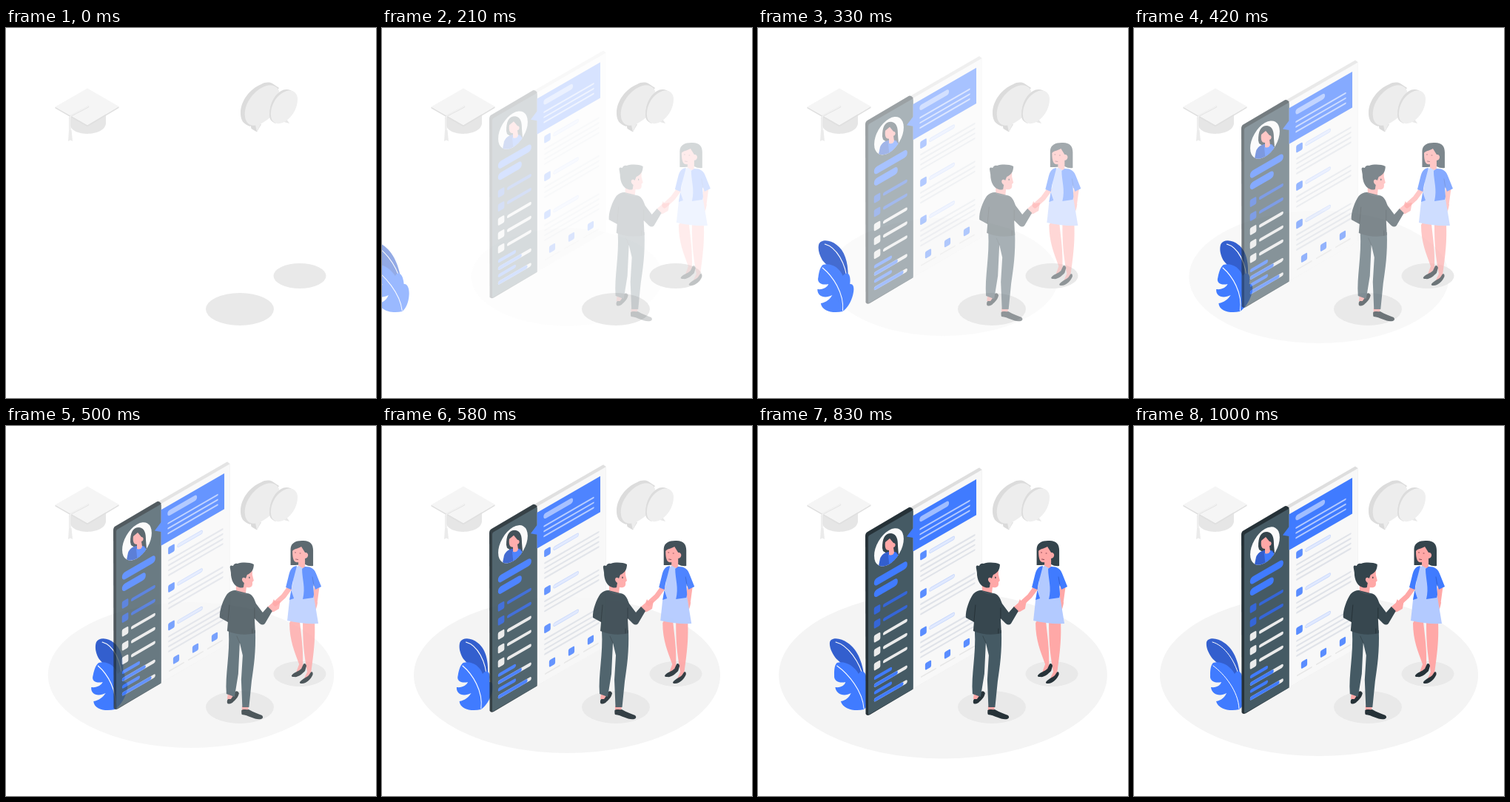
Write an HTML page that moves like this. It is 500 by 500 pixels and loops after 1.04 s.

```html
<!DOCTYPE html>
<html lang="en">
<head>
<meta charset="utf-8">
<title>Job interview</title>
<style>
  html, body { margin: 0; width: 100%; height: 100%; overflow: hidden; background: #fff; }
  svg { display: block; width: 100%; height: 100%; }
  .line { fill: none; stroke-linecap: round; stroke-linejoin: round; }
  .skin { fill: #ffa8a7; }
  .blue { fill: #407bff; }
  .navy { fill: #335fce; }
  .dark { fill: #263238; }
  .slate { fill: #455a64; }
  .knit { fill: #37474f; }
  .hair { fill: #34444c; }
</style>
</head>
<body>
<svg viewBox="0 0 500 500">
  <defs>
    <clipPath id="disc"><circle r="23" transform="matrix(.866 -.5 0 1 177 162)"/></clipPath>
  </defs>

  <ellipse id="floor" rx="215" ry="109.5" fill="#f4f4f4"/>
  <g fill="#e9e9e9">
    <ellipse cx="316" cy="380" rx="46" ry="22"/>
    <ellipse cx="397" cy="335" rx="35.5" ry="17"/>
  </g>

  <g id="cap">
    <path d="M87 118V132C90 147 133 147 135 129V116L110 131Z" fill="#e6e6e6"/>
    <path d="M66.500 106.500L110 131.500L152.500 106V108L110 133.500L66.500 108.500Z" fill="#e0e0e0"/>
    <path d="M66.500 106.500L110 81.500L152.500 106L110 131Z" fill="#f5f5f5"/>
    <path class="line" d="M111 106.500L88 118.500Q86 120 86.500 124V138" stroke="#e4e4e4" stroke-width="2.500"/>
    <path class="line" d="M111 106L88 118Q86.500 120 86.500 124V138" stroke="#f3f3f3" stroke-width="1.300"/>
    <path d="M85 138H88.500L90 153L87 151.500L84 153Z" fill="#ebebeb"/>
  </g>

  <g id="bubbles">
    <path d="M330.500 131L331.500 136L339 140.500L345 130Z" fill="#dadada"/>
    <path d="M317 115C317 98 330 82 345 76C350 73 356 73 360 75L369 81L330 133C321 130 317 125 317 115Z" fill="#dcdcdc"/>
    <path d="M339 140.500L346 126L337 131Z" fill="#ededed"/>
    <path d="M323 120C321 104 333 86 349 79C362 74 371 81 370 93C369 108 360 120 350 126C338 135 325 134 323 120Z" fill="#ededed"/>
    <path d="M372 126L383 129L379 123Z" fill="#e8e8e8"/>
    <path d="M356 117C356 101 364 88 375 83.500C381 82 385 84 388 86L364 129C358 126 356 123 356 117Z" fill="#dcdcdc"/>
    <path d="M358 119C357 105 365 91 377 86C386 82 394 87 394 96C394 110 385 123 374 128C366 131 359 128 358 119Z" fill="#efefef"/>
  </g>

  <g id="plant">
    <path class="navy" d="M98 292C100 285 113 286 122 293C136 302 143 322 144 346H134C130 330 112 322 105 313C100 306 97 298 98 292Z"/>
    <path class="line" d="M106 292C122 296 138 318 143 343" stroke="#fff"/>
    <path class="blue" d="M107 320C118 317 130 324 136 335C140 328 147 331 147 346C152 345 154 352 153 360C152 370 147 380 142 383C130 386 114 383 111 372C118 371 123 366 125 361C116 366 105 363 104 353C112 354 117 350 118 346C110 348 102 345 103 337C103 328 104 323 107 320Z"/>
    <path class="line" d="M107 324C122 335 141 358 142 382" stroke="#fff"/>
  </g>

  <g id="panel">
    <path d="M206 108L299 54.400L302.500 57V299L209.500 353Z" fill="#dedede"/>
    <path class="dark" d="M145 146.500Q145 143 148 141.200L204 108.200Q206.500 107 209.600 110.500V353.500L151 388.300Q147 390.200 145.500 387Z"/>
    <g id="sheet" transform="matrix(.866 -.5 0 1 149 147)">
      <rect x="70" y="-1" width="107.300" height="242" fill="#f8f8f8"/>
      <rect class="slate" y="-.5" width="70" height="242" rx="2"/>
      <path class="blue" d="M60 30.500L70 24V7.300H168.600V55.700H70V37Z"/>
      <circle r="23" cx="32.300" cy="31.200" fill="#fafafa"/>
    </g>
    <g clip-path="url(#disc)">
      <path class="hair" d="M168 163C168 150 171 143 180 143C188 144 189 152 189 160L190 172L180 174L169 167Z"/>
      <path class="navy" d="M162 192L165 177C167 172 171 169 176 168L186 168C190 170 191 176 191 192Z"/>
      <path class="blue" d="M176 172L184 168L189 172V192H178Z"/>
      <path class="skin" d="M172 155L178 150L183 156C187 156 186 162 183 162L184 169Q182 174 177 172V166C173 166 171 163 172 155Z"/>
    </g>
  </g>

  <g id="woman">
    <path class="hair" d="M378.500 166C379 157 387 154.500 396 155C405 155 409 160 409 168V189Q403 190 398 187L385 188H378.500Z"/>
    <path class="skin" d="M379 263L391 264C393 285 396 300 395 325L390 332L386 333L390 322C384 305 377 290 377 266ZM395 264H411C412 290 410 305 406 335L400 343L396 343L401 332C397 310 395 295 395 266Z"/>
    <path class="dark" d="M380 337C384 332 389 332 393 328L396 321.500Q399 320 400 324L398 331C394 335 389 340 383 339Q379 339 380 337ZM391 346C395 341 400 340 403 337L406 332.500Q409 331 408.500 336C406 342 400 348 394 348Q390 348 391 346Z"/>
    <path class="line" d="M377 219L369 230L358 240" stroke="#ffa8a7" stroke-width="7"/>
    <path class="line" d="M414 217L411 239" stroke="#ffa8a7" stroke-width="7"/>
    <path class="skin" d="M408 236L415 238C414 246 412 252 406 253L401 248Z"/>
    <path class="skin" d="M381 169C383 166 388 166 393 163L398 171C403 170 404 178 398 179V190L396 198L389 195V184C384 185 381 182 381 169Z"/>
    <path d="M384 193Q390 187 391 190L397 193L404 195L410 231L416 267Q395 268 374 263L377 235L381 215Z" fill="#b3caff"/>
    <path class="blue" d="M387 189C380 190 378 194 376 202L372 218L379 221L383 233L377 235L381 212ZM398 190C407 190 411 193 414 202L420 217L412 221L409 212L410 228L409 232L395 234C399 218 394 207 394 193Z"/>
    <path class="line" d="M408 204L410 216" stroke="#2f60d5"/>
    <path class="line" d="M384.500 171h1M391 172h1M385.500 180l3 .5" stroke="#8a4450" stroke-width="1"/>
  </g>

  <g id="man"><g transform="translate(.8 0)">
    <path class="dark" d="M292 374C291 368 296 368 299 365L303 359Q306 357 308 361C307 367 303 370 299 374Q293 377 292 374Z"/>
    <path class="skin" d="M293 361L302 362L297 369H292ZM312 378L321 379L320 385H312Z"/>
    <path class="dark" d="M311.500 384C314 382 317 384 321 383C328 387 334 389 339 391Q342 394 338 396C330 398 322 391 312 390Q311 388 311.500 384Z"/>
    <path class="slate" d="M294 276H330C331 305 328 325 325 345L321.500 380H312.500L311 343L313 310L309 293L307 335L302 366L291 362C289 335 296 310 294 276Z"/>
    <path class="line" d="M309 293L305 284" stroke="#37474f"/>
    <path class="skin" d="M346 245L353 239L355 234L357 237L364 236L362 247L355 251L349 252Z"/>
    <path class="skin" d="M310 196L326 194L326 201L328 209L326 211C327 217 324 219 318 218L317 227L304 225V212Z"/>
    <path class="hair" d="M296 192Q295 187 300 189Q302 185 306 186C312 184 322 184 328 187C328 195 324 199 319 201L317 206C312 202 310 209 315 212L314 218Q311 219 308 218C301 216 297 208 297 198Z"/>
    <path class="knit" d="M303 222L319 226C326 227 328 232 331 240L340 252L347 244L353 250L343 267Q340 270 336 267L329 260L330 280C318 283 303 282 292 277L293 265L282 259C281 249 287 234 292 227Q297 222 303 222Z"/>
    <path class="line" d="M304 223Q311 227 319 227" stroke="#4a5b64"/>
    <path class="line" d="M295 242L293 264M329 246V260M326 274V280" stroke="#263238"/>
    <path class="line" d="M322 204v1.500" stroke="#263238" stroke-width="1.200"/>
  </g></g>
</svg>
<script>
const BLUE = '#407bff', NAVY = '#3566d8', SKY = '#5a8dff', WHITE = '#ebebeb', GREY = '#e0e3e9';
const $ = id => document.getElementById(id);

function add(attrs) {
  const el = document.createElementNS('http://www.w3.org/2000/svg', 'rect');
  for (const key in attrs) el.setAttribute(key, attrs[key]);
  $('sheet').append(el);
}
// Horizontal bar with round ends, centred on y
const bar = (x1, x2, y, h, fill) =>
  add({ x: x1, y: y - h / 2, width: x2 - x1, height: h, rx: h / 2, fill });
const icon = (x, y, s, fill) =>
  add({ x: x - s / 2, y: y - s / 2, width: s, height: s, rx: 2, fill });

// Sidebar
bar(9, 61, 68, 10, BLUE);
bar(9, 46, 83.5, 10, BLUE);
for (let i = 0; i < 5; i++) {
  const y = 106 + i * 18.9, fill = i < 2 ? NAVY : WHITE;
  icon(13.9, y, 10, fill);
  bar(23, 61, y, 4.4, fill);
}
[[37, 0], [46, 61], [37, 0], [55, 61]].forEach(([done, end], i) => {
  const y = 197 + i * 9.8;
  if (end) bar(9, end, y, 4.8, WHITE);
  bar(9, done, y, 4.8, BLUE);
});

// Header
bar(80, 126, 18, 7.5, '#a0bdff');
for (let i = 0; i < 3; i++) bar(80, 159, 31.1 + i * 6.8, 2.2, '#b3caff');

// Sections
[4, 3, 4].forEach((lines, i) => {
  const y = 68.5 + i * 51.5;
  icon(86, y, 10, SKY);
  bar(95, 135, y + .5, 5.4, '#c6d6fb');
  bar(95.8, 134.2, y + .5, 3.6, '#e0e9ff');
  for (let j = 0; j < lines; j++) bar(81, 167, y + 13 + j * 6.7, 2.4, GREY);
});
for (let i = 0; i < 3; i++) {
  icon(93.5 + i * 30, 221, 9.5, SKY);
  bar(82 + i * 30, 106 + i * 30, 231.5, 1.8, '#e6e6e6');
}

const clamp = v => Math.min(1, Math.max(0, v));
const mix = (a, b, p) => a + (b - a) * p;

// cubic-bezier(.36, -.01, .5, 1.38), solved by bisection
function ease(x) {
  if (x <= 0 || x >= 1) return clamp(x);
  const curve = (s, a, b) => 3 * (1 - s) * s * ((1 - s) * a + s * b) + s ** 3;
  let lo = 0, hi = 1;
  for (let i = 0; i < 24; i++) {
    const mid = (lo + hi) / 2;
    if (curve(mid, .36, .5) < x) lo = mid; else hi = mid;
  }
  return curve(lo, -.01, 1.38);
}

function pose(id, transform, opacity) {
  $(id).setAttribute('transform', transform);
  $(id).setAttribute('opacity', clamp(opacity));
}

// Plant rushes in from the left, then sways by skewing
function plantPose(u) {
  let shift = 0, skew, alpha = 1;
  if (u < .6) {
    const p = ease(u / .6);
    shift = mix(-250, 0, p);
    skew = mix(20, -10, p);
    alpha = p;
  } else if (u < .8) skew = mix(-10, 2, ease((u - .6) / .2));
  else skew = mix(2, 0, ease((u - .8) / .2));
  pose('plant', `translate(${shift} 335) skewX(${skew}) translate(0 -335)`, alpha);
}

function draw(now) {
  const step = Math.floor((now % 1040) * .024 + .1);  // 24 steps per second
  const u = step < 3 ? 0 : clamp(step / 24 + .029);
  const p = ease(u), gap = 30 * (1 - p);
  pose('floor', `translate(250 336.500) scale(${mix(.5, 1, p)})`, p);
  pose('panel', `translate(0 ${-gap})`, p);
  pose('woman', `translate(${gap} 0)`, p);
  pose('man', `translate(${gap} 0)`, p);
  plantPose(u);
}

const start = performance.now();
function tick() {
  draw(performance.now() - start);
  requestAnimationFrame(tick);
}
tick();
</script>
</body>
</html>
```
